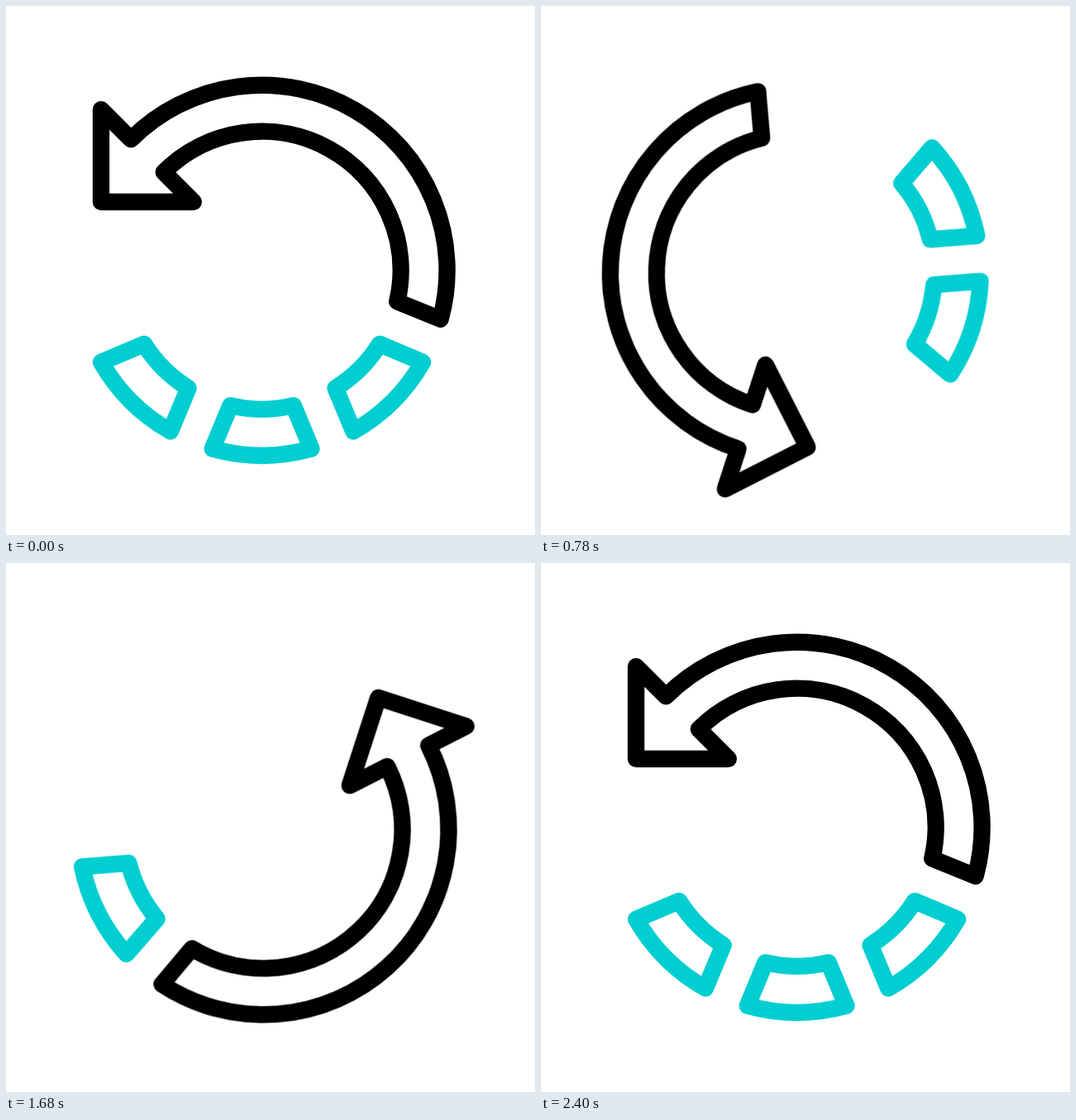
An HTML page that plays this animation: 640x640 px, repeating every 2420 ms.

```html
<!DOCTYPE html>
<html lang="en">
<head>
<meta charset="utf-8">
<title>Turning arrow</title>
<style>
  html, body { margin: 0; width: 100%; height: 100%; overflow: hidden; background: #fff; }
  svg { display: block; width: 100vw; height: 100vh; }
  path { fill: none; stroke: #000; stroke-width: 20.4; stroke-linejoin: round; }
  .wheel {
    transform-origin: 309.6px 321.8px;
    animation: turn 2420ms steps(121) infinite;
  }
  /* each block hides for 1080 ms, one 400 ms after the other */
  .block { stroke: #00ced1; animation: hide 2420ms step-end infinite; }
  .right  { animation-delay: -1960ms; }
  .middle { animation-delay: -1560ms; }
  .left   { animation-delay: -1160ms; }
  @keyframes turn { to { transform: rotate(-363deg); } }
  @keyframes hide { 0% { opacity: 0; } 44.628%, 100% { opacity: 1; } }
</style>
</head>
<body>
<svg viewBox="0 0 640 640">
  <g class="wheel">
    <!-- all arcs share the centre 309.6, 319.8 -->
    <path d="M115 237V125.2L151.2 161.4A224 224 0 0 1 525.66 378.9L473.3 357.6A168 168 0 0 0 190.8 201L226.8 237Z"/>
    <path class="block right" d="M504.1 431L452.1 409A168 168 0 0 1 398.6 462.3L420.3 514.5A224 224 0 0 0 504.1 431Z"/>
    <path class="block middle" d="M271.4 483.4A168 168 0 0 0 347.8 483.4L369.4 535.7A224 224 0 0 1 249.8 535.7Z"/>
    <path class="block left" d="M115.1 431L167.1 409A168 168 0 0 0 220.6 462.3L198.9 514.5A224 224 0 0 1 115.1 431Z"/>
  </g>
</svg>
</body>
</html>
```
